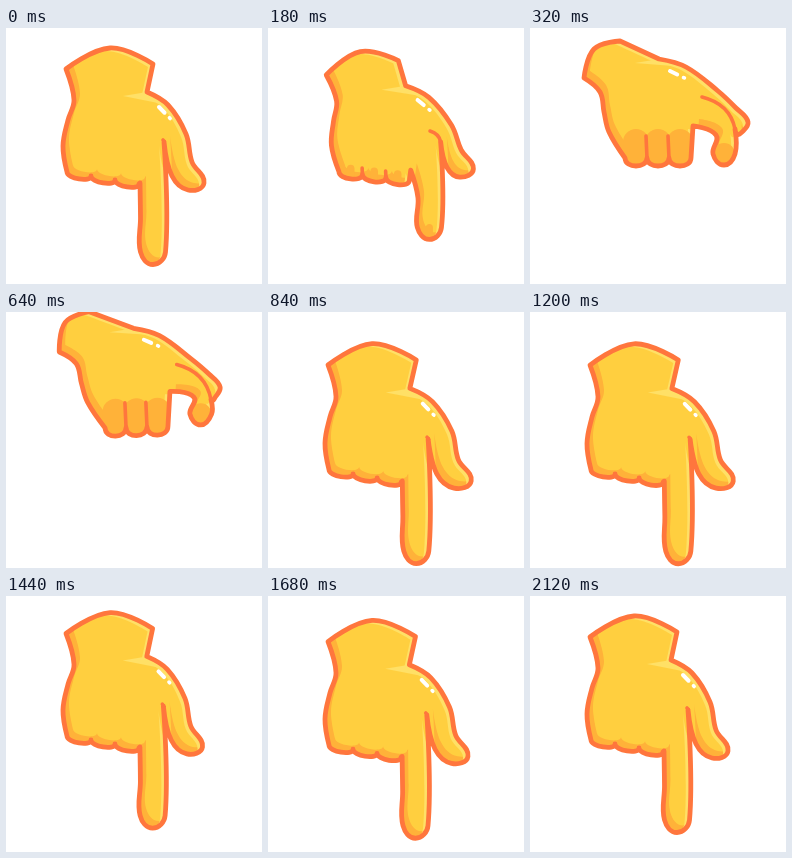
These frames come from a looping animation (256x256 px, 2140 ms). An HTML page with a canvas:

```html
<!DOCTYPE html>
<html lang="en">
<head>
<meta charset="utf-8">
<title>Pointing hand</title>
<style>
html, body { margin: 0; width: 100%; height: 100%; overflow: hidden; background: #fff; }
canvas { display: block; width: 256px; height: 256px; }
</style>
</head>
<body>
<canvas id="stage" width="256" height="256"></canvas>
<script>
const ctx = document.getElementById('stage').getContext('2d');
const LOOP = 2140, STEP = 20;
const LINE = '#ff763d', FILL = '#ffcf3f', SHADE = '#ffb239', LIGHT = '#ffe066';

// Key points of the hand: [pointing, curled]
const joints = {
  cuffL: [[60, 41], [54, 50]],
  cuffTop: [[104, 20], [64, 21]],
  cuffR: [[147, 36], [90, 13]],
  neck: [[141, 64], [129, 31]],
  back: [[162, 77], [156, 39]],
  thumbTop: [[180, 106], [188, 63]],
  thumbBend: [[186, 134], [206, 80]],
  thumbTip: [[198, 155], [218, 94]],
  thumbLow: [[182, 162], [211, 105]],
  thumbIn: [[166, 148], [207, 106]],
  crotch: [[158, 114], [205, 101]],
  tip: [[147, 224], [194, 126]],
  indexIn: [[134.5, 190], [186, 107]],
  web: [[134, 155], [163, 98]],
  fistR: [[133, 156], [161, 130]],
  fistL: [[61, 144], [95, 130]],
  palm: [[57, 118], [79, 104]],
  heel: [[62, 92], [74, 84]],
  pulse: [[68, 72], [70, 64]],
  crease: [[157, 112], [172, 69]],
  bend: [[158, 113], [200, 76]],
  shine: [[153, 79], [140, 43]]
};

const lerp = (a, b, k) => a + (b - a) * k;
const between = (p, q, k) => [lerp(p[0], q[0], k), lerp(p[1], q[1], k)];
const add = (p, x, y) => [p[0] + x, p[1] + y];

const sine = x => (1 - Math.cos(Math.PI * x)) / 2;
const settle = x => 1 - (1 - x) ** 6;

// time, curl, drop
const keys = [
  [0, 0, 0], [100, 0, 6], [320, 1, 0], [530, 1.15, -17], [640, 1.12, -14], [830, 0, 15],
  [870, 0, 17], [1050, 0, -6], [1230, 0, 17], [1410, 0, -6], [1590, 0, 17], [LOOP, 0, 0]
];

function motion(t) {
  const i = keys.findIndex(k => k[0] > t);
  const [t0, c0, d0] = keys[i - 1], [t1, c1, d1] = keys[i];
  const ease = t1 === LOOP ? settle : sine;
  const k = ease((t - t0) / (t1 - t0));
  return [lerp(c0, c1, k), lerp(d0, d1, k)];
}

// Lower parts travel further, and the thumb opens as the hand drops.
function place(curl, drop) {
  const hand = {};
  for (const name in joints) {
    const [x, y] = between(...joints[name], curl);
    hand[name] = [
      x + drop * .005 * Math.max(0, x - 130),
      y + drop * (.74 + .26 * y / 237)
    ];
  }
  return hand;
}

// Smooth curve; handles follow the neighbours and scale with the segment.
function curve(path, pts, sharp) {
  const tangent = i => {
    const a = pts[i - 1], b = pts[i + 1];
    if (!a || !b || sharp.includes(pts[i])) return [0, 0];
    const len = Math.hypot(b[0] - a[0], b[1] - a[1]) || 1;
    return [(b[0] - a[0]) / len, (b[1] - a[1]) / len];
  };
  for (let i = 0; i < pts.length - 1; i++) {
    const p = pts[i], q = pts[i + 1], u = tangent(i), v = tangent(i + 1);
    const h = Math.hypot(q[0] - p[0], q[1] - p[1]) * .37;
    path.bezierCurveTo(...add(p, u[0] * h, u[1] * h), ...add(q, -v[0] * h, -v[1] * h), ...q);
  }
}

function outlineOf(h, radius, bulge) {
  const path = new Path2D();
  path.moveTo(...h.cuffL);
  curve(path, [
    h.cuffL, h.cuffTop, h.cuffR, h.neck, h.back, h.thumbTop, h.thumbBend,
    h.thumbTip, h.thumbLow, h.thumbIn, h.crotch,
    add(h.tip, radius, 0), add(h.tip, 0, radius), add(h.tip, -radius, 0),
    h.indexIn, h.web, h.fistR
  ], [h.cuffR, h.neck, h.crotch, h.web]);
  for (let i = 0; i < 3; i++) {
    const p = between(h.fistR, h.fistL, i / 3), q = between(h.fistR, h.fistL, (i + 1) / 3);
    path.bezierCurveTo(...add(p, 0, bulge * 1.33), ...add(q, 0, bulge * 1.33), ...q);
  }
  curve(path, [h.fistL, h.palm, h.heel, h.pulse, h.cuffL], []);
  path.closePath();
  return path;
}

function line(color, width, ...pts) {
  ctx.strokeStyle = color;
  ctx.lineWidth = width;
  ctx.beginPath();
  pts.forEach(p => ctx.lineTo(...p));
  ctx.stroke();
}

// Colours the part of the shape left bare when a copy of it is shifted.
function rim(outline, color, dx, dy) {
  const path = new Path2D();
  path.rect(-50, -50, 400, 400);
  path.addPath(outline, new DOMMatrix([1, 0, 0, 1, dx, dy]));
  ctx.fillStyle = color;
  ctx.fill(path, 'evenodd');
}

function draw(curl, drop) {
  const h = place(curl, drop);
  const radius = 12.5 - 1.5 * curl;
  const outline = outlineOf(h, radius, 5 + 3 * curl);

  ctx.fillStyle = '#fff';
  ctx.fillRect(0, 0, 256, 256);
  ctx.lineCap = ctx.lineJoin = 'round';

  ctx.save();
  ctx.clip(outline);
  ctx.fillStyle = FILL;
  ctx.fill(outline);
  rim(outline, SHADE, 6, -7);
  rim(outline, LIGHT, -5, 3);
  ctx.fillStyle = LIGHT;
  ctx.beginPath();
  [add(h.neck, -24, 4), h.neck, h.back].forEach(p => ctx.lineTo(...p));
  ctx.fill();
  if (curl > 0) {
    const grow = Math.min(1, curl);
    for (let i = 0; i < 3; i++) {
      const knuckle = between(h.fistR, h.fistL, (i + .5) / 3);
      line(SHADE, 26 * grow, add(knuckle, 0, 8), add(knuckle, 0, -16 * grow));
    }
    line(SHADE, 2 * radius * grow, add(h.tip, 0, radius), h.tip);
  }
  ctx.restore();

  ctx.strokeStyle = LINE;
  ctx.lineWidth = 4.8;
  ctx.stroke(outline);
  ctx.lineWidth = 3.6;
  ctx.beginPath();
  ctx.moveTo(...h.crease);
  ctx.quadraticCurveTo(...h.bend, ...h.crotch);
  ctx.stroke();
  for (const k of [1 / 3, 2 / 3]) {
    const gap = between(h.fistR, h.fistL, k);
    line(LINE, 3.6, gap, add(gap, -curl, -22 * curl));
  }

  const angle = .8 - .35 * curl;
  const along = d => add(h.shine, d * Math.cos(angle), d * Math.sin(angle));
  line('#fff', 4, along(0), along(8));
  line('#fff', 3.6, along(15), along(16));
}

function tick() {
  const t = Math.floor((performance.now() % LOOP) / STEP) * STEP;
  draw(...motion(t));
  requestAnimationFrame(tick);
}
tick();
</script>
</body>
</html>
```
